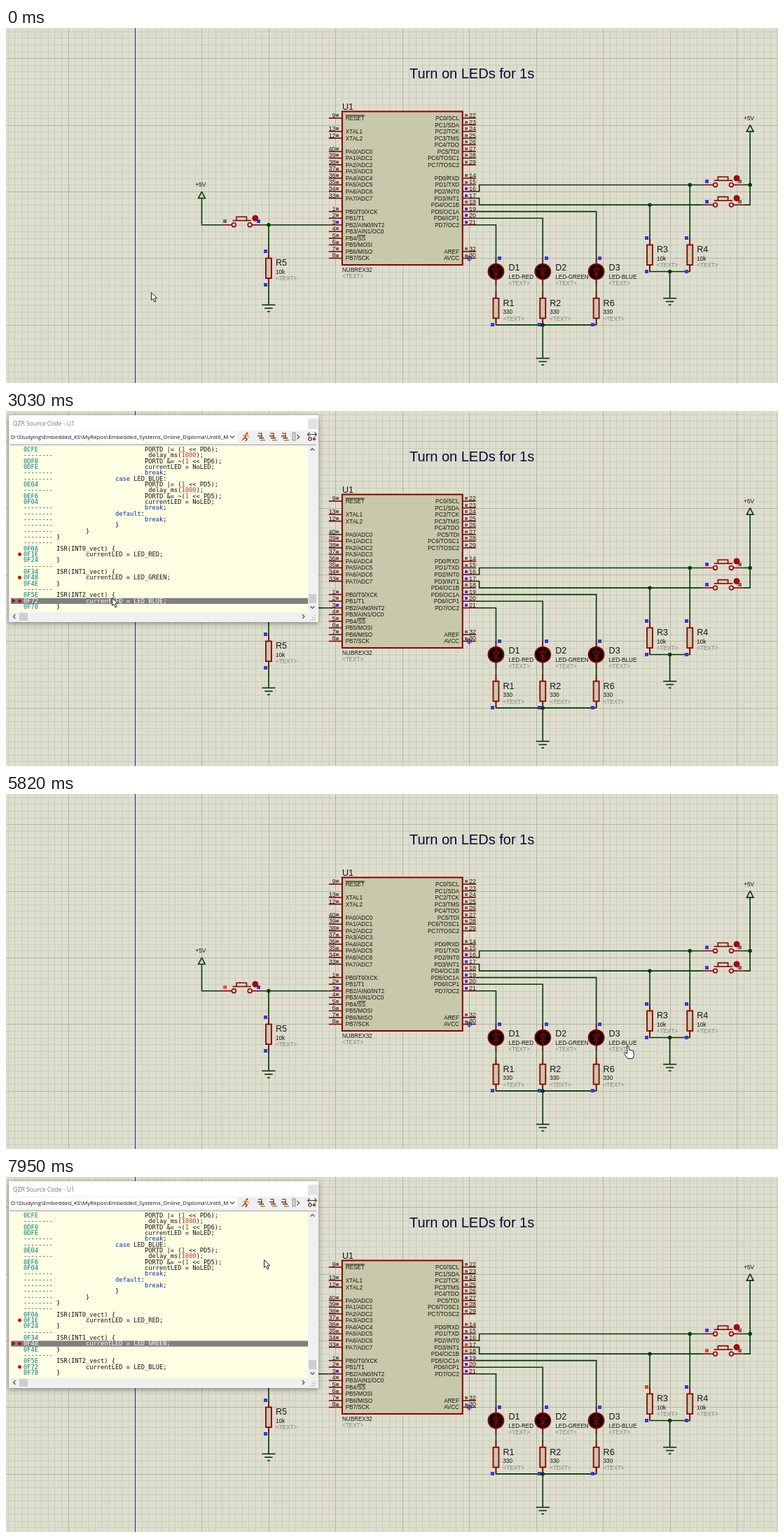
Recreate the animation shown at these times as an HTML page with a canvas. Size 1102 px wide and 508 px high, loop 8000 ms.

```html
<!DOCTYPE html>
<html>
<head>
<meta charset="utf-8">
<style>
html, body { margin: 0; width: 100%; height: 100%; overflow: hidden; background: #dedecf; }
canvas { display: block; }
</style>
</head>
<body>
<canvas id="stage" width="1102" height="508"></canvas>
<script>
const ctx = document.getElementById('stage').getContext('2d');
const LOOP = 8000, FRAME = 1000 / 15;
const WIRE = '#003c00', RED = '#8a0000', PAPER = '#dedecf', BODY = '#c8c8aa', INK = '#151515';
const GREY = '#6c6c60', BLUE = '#3838d8', HIGH = '#f04848';
const SANS = '"Liberation Sans", Arial, sans-serif';
const UI = '"Open Sans", "Noto Sans", sans-serif';
const MONO = '"DejaVu Sans Mono", "Liberation Mono", monospace';

// The schematic is laid out in grid cells: columns from the blue axis, rows from pin 9.
const CELL = 9.545;
const X = col => 184 + col * CELL;
const Y = row => 129 + row * CELL;

// ---------- drawing helpers ----------
function stroke(color, width, points, fill) {
  ctx.beginPath();
  for (let i = 0; i < points.length; i += 2) ctx.lineTo(points[i], points[i + 1]);
  if (fill) {
    ctx.closePath();
    ctx.fillStyle = fill;
    ctx.fill();
  }
  ctx.strokeStyle = color;
  ctx.lineWidth = width;
  ctx.stroke();
}
const onGrid = points => points.map((v, i) => i % 2 ? Y(v) : X(v));
const wire = (...points) => stroke(WIRE, 1.6, onGrid(points));
const lead = (...points) => stroke(RED, 1.6, onGrid(points));
function rect(x, y, w, h, fill, border, width = 1) {
  ctx.fillStyle = fill;
  ctx.fillRect(x, y, w, h);
  if (!border) return;
  ctx.strokeStyle = border;
  ctx.lineWidth = width;
  ctx.strokeRect(x, y, w, h);
}
function circle(x, y, r, fill, border, width = 1.6) {
  ctx.beginPath();
  ctx.arc(x, y, r, 0, 2 * Math.PI);
  ctx.fillStyle = fill;
  ctx.fill();
  if (!border) return;
  ctx.strokeStyle = border;
  ctx.lineWidth = width;
  ctx.stroke();
}
function text(s, x, y, size = 8.15, color = INK, align = 'left', family = SANS) {
  ctx.font = `${size}px ${family}`;
  ctx.fillStyle = color;
  ctx.textAlign = align;
  ctx.fillText(s, x, y);
}
const placeholder = (x, y) => text('<TEXT>', x, y, 8.15, '#85857c');
const marker = (col, row, color = BLUE, size = 5) =>
  rect(Math.round(X(col) - size / 2), Math.round(Y(row) - size / 2), size, size, color);
const junction = (col, row) => circle(X(col), Y(row), 2.7, WIRE);

// ---------- schematic ----------
function grid() {
  rect(0, 0, 1102, 508, PAPER);
  for (const major of [false, true]) {
    for (let i = -20; i < 100; i++) {
      if ((i % 10 === 0) !== major) continue;
      const color = major ? '#b4b49f' : '#cdcdbb';
      rect(Math.round(X(i)), 0, 1, 508, color);
      rect(0, Math.round(Y(i + 1)), 1102, 1, color);
    }
  }
  rect(X(0), 0, 1, 508, '#2020b0');
}
function label(x, y, name, value) {
  text(name, x, y, 12.5);
  text(value, x, y + 11.5);
  placeholder(x, y + 21);
}
function resistor(col, row, name, value, top) {
  lead(col, row - 2.5, col, row + 2.5);
  rect(X(col) - 4, Y(row - 1.5), 8, 3 * CELL, BODY, RED, 1.8);
  label(X(col) + 10, Y(row) - 3.5, name, value);
  if (top) marker(col - 0.5, row - 2.5, top);
  marker(col - 0.5, row + 2.5);
}
function led(col, name, color, fill, level) {
  const x = X(col), y = Y(23);
  lead(col, 21, col, 25);
  circle(x, y, 11, fill, RED, 1.8);
  lead(col, 22, col, 24);
  stroke(RED, 1.4, [x - 5, y - 4, x + 5, y - 4, x, y + 4, x - 5, y - 4]);
  lead(col - 0.5, 23.5, col + 0.5, 23.5);
  label(x + 18, y - 1.5, name, 'LED-' + color);
  marker(col + 0.5, 21, level);
}
function button(col, row, left, right) {
  for (const side of [-1, 1]) {
    lead(col + side * 3, row, col + side * 1.5, row);
    circle(X(col + side * 1.2), Y(row), 2.9, PAPER, RED);
    marker(col + side * 2.5, row - 0.5, side < 0 ? left : right);
  }
  const bar = row - 0.65, knob = row - 1.2;
  lead(col - 1.4, bar, col + 1.4, bar);
  lead(col - 0.8, bar, col - 0.8, knob, col + 0.7, knob, col + 0.7, bar);
  circle(X(col + 2), Y(row - 1), 4, '#b00000', RED, 1);
}
function ground(col, row) {
  for (let i = 0; i < 3; i++) {
    const half = 1 - i * 0.4, y = row + i / 2;
    wire(col - half, y, col + half, y);
  }
}
function supply(col, row) {
  wire(col, row, col + 0.5, row + 1, col - 0.5, row + 1, col, row);
  text('+5V', X(col) - 1.5, Y(row) - 7, 8.15, INK, 'center');
}

// Pins are [row, number, name]; "~" puts a bar over the rest of the name.
const pins = (row, number, step, names) => names.map((name, i) => [row + i, number + step * i, name]);
const port = (letter, names) => names.split(' ').map((s, i) => `P${letter}${i}/${s}`);
const LEFT_PINS = [
  ...pins(0, 9, 0, ['~RESET']),
  ...pins(2, 13, -1, ['XTAL1', 'XTAL2']),
  ...pins(5, 40, -1, port('A', 'ADC0 ADC1 ADC2 ADC3 ADC4 ADC5 ADC6 ADC7')),
  ...pins(14, 1, 1, port('B', 'T0/XCK T1 AIN0/INT2 AIN1/OC0 ~SS MOSI MISO SCK'))
];
const RIGHT_PINS = [
  ...pins(0, 22, 1, port('C', 'SCL SDA TCK TMS TDO TDI TOSC1 TOSC2')),
  ...pins(9, 14, 1, port('D', 'RXD TXD INT0 INT1 OC1B OC1A ICP1 OC2')),
  ...pins(20, 32, -2, ['AREF', 'AVCC'])
];
function pinName(name, x, y, align) {
  const [plain, barred] = name.split('~');
  text(plain + (barred || ''), x, y, 8.15, INK, align);
  if (!barred) return;
  const from = x + ctx.measureText(plain).width;
  stroke(INK, 1, [from, y - 7, from + ctx.measureText(barred).width, y - 7]);
}
function chip(levels) {
  rect(X(31), Y(-1), 18 * CELL, 23 * CELL, BODY, RED, 2);
  text('U1', X(31), 117, 12.5);
  text('NUBREX32', X(31), 348.5);
  placeholder(X(31), 357.5);
  for (const [row, number, name] of LEFT_PINS) {
    lead(29, row, 31, row);
    text(number, X(30), Y(row) - 1, 8.7, INK, 'right');
    marker(30.3, row - 0.4, levels[number] || GREY, 4);
    pinName(name, X(31.5), Y(row) + 3, 'left');
  }
  for (const [row, number, name] of RIGHT_PINS) {
    lead(49, row, 51, row);
    text(number, X(50), Y(row) - 1, 8.7);
    marker(49.6, row - 0.4, levels[number] || GREY, 4);
    pinName(name, X(48.5), Y(row) + 3, 'right');
  }
  circle(X(50), Y(21), 3, 'transparent', '#202090', 1);
  stroke('#202090', 1, onGrid([49.5, 21, 50.5, 21]));
  stroke('#202090', 1, onGrid([50, 20.5, 50, 21.5]));
}
function schematic(s) {
  const int2 = s.int2 ? HIGH : BLUE, int1 = s.int1 ? '#d84820' : BLUE, blue = s.lit ? HIGH : BLUE;
  grid();
  text('Turn on LEDs for 1s', 576, 72, 20, '#08083c');

  supply(10, 11);
  wire(10, 12, 10, 16, 13, 16);
  wire(19, 16, 29, 16);
  wire(20, 16, 20, 28);
  junction(20, 16);
  ground(20, 28);
  resistor(20, 22.5, 'R5', '10k', int2);
  button(16, 16, s.powered ? HIGH : GREY, int2);

  supply(92, 1);
  wire(92, 2, 92, 13, 91, 13);
  wire(91, 10, 92, 10);
  wire(51, 11, 51.5, 11, 51.5, 10, 85, 10);
  wire(51, 12, 51.5, 12, 51.5, 13, 85, 13);
  wire(77, 13, 77, 23, 83, 23, 83, 10);
  wire(80, 23, 80, 27);
  junction(92, 10);
  junction(77, 13);
  junction(83, 10);
  junction(80, 23);
  ground(80, 27);
  resistor(77, 20.5, 'R3', '10k', int1);
  resistor(83, 20.5, 'R4', '10k', BLUE);
  button(88, 10, BLUE, GREY);
  button(88, 13, int1, GREY);

  chip({ 3: int2, 16: BLUE, 17: int1, 19: blue, 20: BLUE, 21: BLUE });
  wire(54, 31, 69, 31);
  wire(61, 31, 61, 36);
  ground(61, 36);
  [54, 61, 69].forEach((col, i) => {
    const color = ['RED', 'GREEN', 'BLUE'][i], isBlue = color === 'BLUE';
    wire(51, 16 - i, col, 16 - i, col, 31);
    led(col, 'D' + (i + 1), color, isBlue && s.lit ? '#0000dc' : '#080000', isBlue ? blue : BLUE);
    resistor(col, 28.5, ['R1', 'R2', 'R6'][i], '330');
  });
  junction(61, 31);
}

// ---------- debugger window ----------
// Each line is "address|indent in tabs|code".
const ledCase = (bit, a, b, c) => [
  `${a}|3|PORTD |= (1 << ${bit});`, '|3|_delay_ms(1000);',
  `${b}|3|PORTD &= ~(1 << ${bit});`, `${c}|3|currentLED = NoLED;`, '|3|break;'
];
const handler = (n, color, a, b, c) => [
  '|0|', `${a}|0|ISR(INT${n}_vect) {`, `${b}|1|currentLED = LED_${color};`, `${c}|0|}`
];
const CODE = [
  ...ledCase('PD6', '0CFE', '0DF0', '0DFE'),
  '|2|case LED_BLUE:',
  ...ledCase('PD5', '0E04', '0EF6', '0F04'),
  '|2|default:', '|3|break;', '|2|}', '|1|}', '|0|}',
  ...handler(0, 'RED', '0F0A', '0F1E', '0F24'),
  ...handler(1, 'GREEN', '0F34', '0F48', '0F4E'),
  ...handler(2, 'BLUE', '0F5E', '0F72', '0F78')
];
const CHAR = 5.25, CODE_SIZE = CHAR / 0.602;

function codeLine(entry, row, activeLed) {
  const [, address, indent, source] = entry.match(/(.*?)\|(\d)\|(.*)/);
  const y = 55 + row * 8.335;
  const active = source.includes(`LED_${activeLed};`);
  const put = (s, x, color) => text(s, x, y + 3, CODE_SIZE, active ? '#fff' : color, 'left', MONO);
  if (active) {
    rect(7, y - 4, 424, 8.3, '#808080');
    stroke('#900000', 0.8, [9, y - 2.5, 13, y, 9, y + 2.5], '#d00000');
  }
  if (/LED_\w+;/.test(source)) circle(19.5, y, 2.5, '#d00000');
  put(address || '--------', 25, address ? '#007878' : '#104848');
  for (const m of source.matchAll(/\b(case|break|default)\b|\b(\d+)\b|[^\s\w]+|\w+/g))
    put(m[0], 72 + (indent * 8 + m.index) * CHAR, m[1] ? '#0030b0' : m[2] ? '#c03020' : '#111');
}
function chevron(x, y, quarterTurns) {
  ctx.save();
  ctx.translate(x, y);
  ctx.rotate(quarterTurns * Math.PI / 2);
  stroke('#505050', 1.2, [-3, -1.5, 0, 1.5, 3, -1.5]);
  ctx.restore();
}
function stepIcon(x) {
  stroke('#a05020', 1.3, [x - 4, 32, x + 1, 32, x + 1, 38]);
  for (let i = 0; i < 3; i++) rect(x - 5 + i * 2, 35 + i * 3, 7, 1.5, i < 2 ? '#504030' : '#c08020');
}
function runIcon(x) {
  circle(x + 2, 32, 1.6, '#d04010');
  stroke('#c03010', 1.6, [x + 1, 34, x - 1, 38, x + 2, 40, x, 43]);
  stroke('#e08020', 1.3, [x - 4, 36, x, 34, x + 5, 37]);
  stroke('#c03010', 1.3, [x - 1, 38, x - 5, 42]);
}
function toolbar(hover) {
  rect(5, 29, 325, 16, '#fff');
  text('D:\\Studying\\Embedded_KS\\MyRepos\\Embedded_Systems_Online_Diploma\\Unit6_M', 7, 40, 7.97, '#111', 'left', UI);
  chevron(323, 37, 0);
  if (hover) rect(333.5, 29.5, 16, 16, '#cce4f7', '#90c8f0');
  runIcon(342);
  for (let i = 0; i < 3; i++) stepIcon(364 + i * 17);
  rect(409, 31, 4, 11, '#d8d8d8', '#909090');
  chevron(417, 37, -1);
  rect(431, 33, 12, 1, '#333');
  chevron(432, 33.5, 1);
  chevron(442, 33.5, -1);
  circle(434, 40, 2.2, '#fff', '#333', 1.2);
  circle(440, 40, 2.2, '#b04020');
}
function sourceWindow(activeLed, hover) {
  ctx.save();
  ctx.shadowColor = 'rgba(0,0,0,.4)';
  ctx.shadowBlur = 7;
  ctx.shadowOffsetY = 2;
  rect(4, 6, 442, 296, '#f0f0f0');
  ctx.restore();
  rect(4, 6, 442, 22, '#fff');
  text('QZR Source Code - U1', 10, 21, 8.6, '#777', 'left', UI);
  rect(431, 11, 14, 15, '#e2e2e4');
  toolbar(hover);
  rect(6, 48, 437, 1, '#a0a0a0');
  rect(6, 49, 425, 239, '#ffffe4');
  CODE.forEach((entry, row) => codeLine(entry, row, activeLed));
  rect(432, 262, 11, 13, '#cdcdcd');
  rect(19, 289, 12, 11, '#cdcdcd');
  chevron(437.5, 55, 2);
  chevron(437.5, 281, 0);
  chevron(12, 294, 1);
  chevron(424.5, 294, -1);
  for (let i = 0; i < 3; i++)
    for (let j = 0; j <= i; j++) rect(440 - j * 3, 292 + i * 3, 1.5, 1.5, '#b0b0b0');
}

// ---------- pointer ----------
const START = { x: 207, y: 378 };
const MOVES = [
  { from: 130, to: 200, x: 214, y: 377 },
  { from: 400, to: 600, x: 218, y: 356 },
  { from: 990, to: 1450, x: 337, y: 273 },
  { from: 2170, to: 2700, x: 107, y: 206 },
  { from: 2760, to: 2960, x: 150, y: 268 },
  { from: 3030, to: 3820, x: 340, y: 39 },
  { from: 5080, to: 5880, x: 889, y: 361 },
  { from: 5950, to: 6220, x: 838, y: 362 },
  { from: 6280, to: 6680, x: 1028, y: 248 },
  { from: 7610, to: 7950, x: 368, y: 118 }
];
const ease = p => p * p * p * (p * (p * 6 - 15) + 10);

function pointerAt(t) {
  const i = MOVES.findLastIndex(m => t >= m.from);
  if (i < 0) return START;
  const move = MOVES[i], before = MOVES[i - 1] || START;
  const steps = Math.round((move.to - move.from) / FRAME) + 1;
  const done = Math.floor((t - move.from) / FRAME + 0.1) + 1;
  const p = ease(Math.min(1, done / steps));
  return { x: before.x + (move.x - before.x) * p, y: before.y + (move.y - before.y) * p };
}
function drawPointer({ x, y }, hand, clicked) {
  if (clicked) circle(x + 0.5, y + 4.5, 9.5, 'rgba(255,225,0,.7)');
  ctx.save();
  ctx.translate(Math.round(x) + 0.5, Math.round(y) + 0.5);
  ctx.lineJoin = 'round';
  stroke('#222', 1, hand
    ? [-1, 0, 1, 0, 2, 6, 8, 7, 9, 13, 7, 18, 0, 18, -5, 11, -4, 9, -1, 11, -1, 0]
    : [0, 0, 0, 11, 2.5, 9, 4.5, 13.5, 6.5, 12.5, 4.5, 8.3, 8, 8, 0, 0], '#fff');
  ctx.restore();
}

// ---------- timeline ----------
function render(now) {
  const t = now % LOOP;
  const within = (a, b = LOOP) => t >= a && t < b;
  schematic({
    powered: within(1650),
    int2: within(1720, 1900),
    int1: within(7020),
    lit: within(4075, 5150)
  });
  if (within(1830, 4210)) sourceWindow('BLUE', within(3820));
  if (within(7085)) sourceWindow('GREEN', false);
  drawPointer(pointerAt(t),
    within(1380, 1830) || within(5740, 7085),
    within(1650, 1780) || within(3880, 4010) || within(6950, 7085));
  requestAnimationFrame(render);
}
requestAnimationFrame(render);
</script>
</body>
</html>
```
